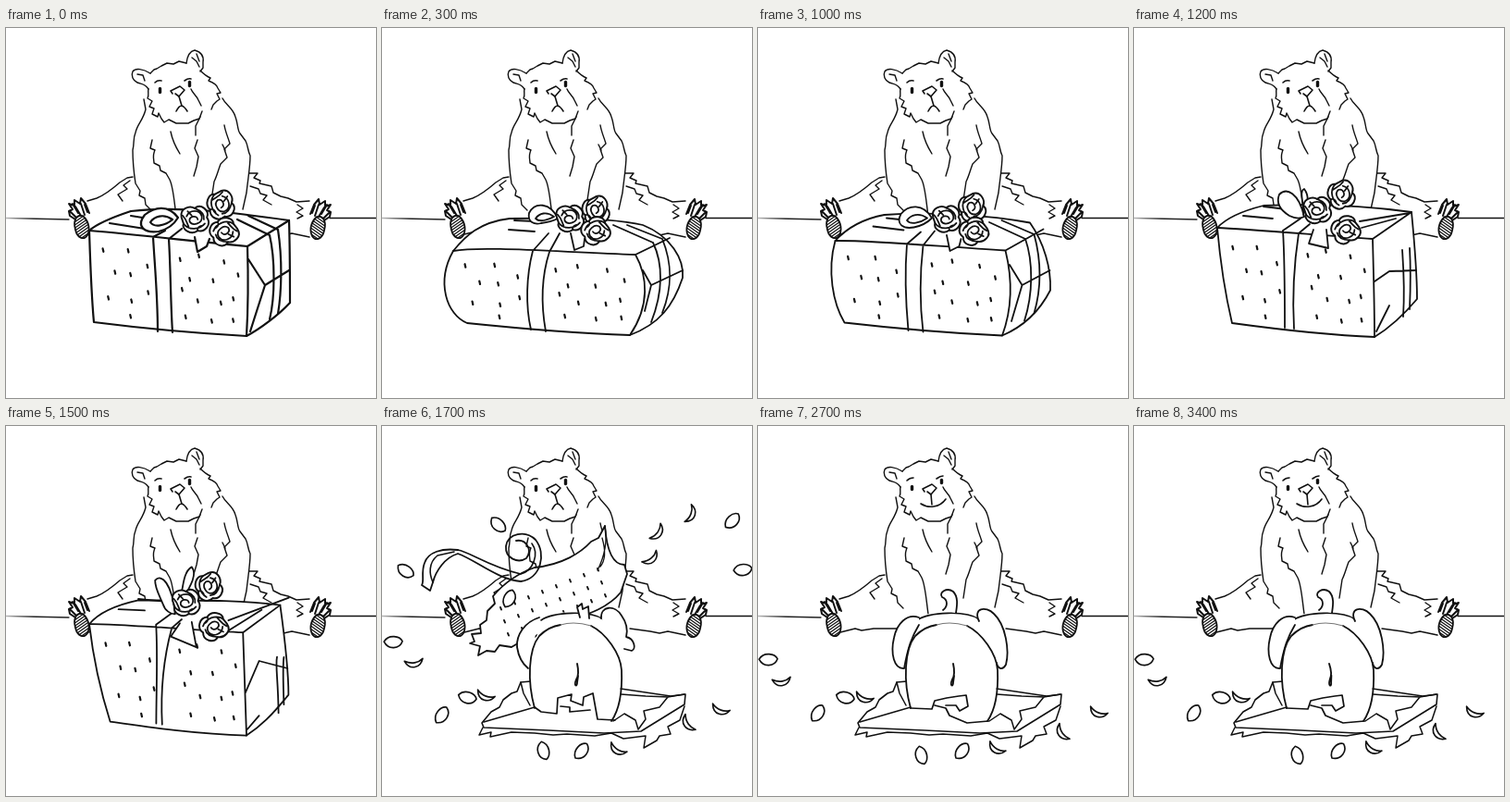
These frames come from a looping animation (400x400 px, 3.5 s). An HTML page with a canvas:

```html
<!DOCTYPE html>
<html lang="en">
<meta charset="utf-8">
<title>Bear and gift</title>
<style>
  html, body { margin: 0; width: 100%; height: 100%; overflow: hidden; background: #fff }
  canvas { display: block; width: 400px; height: 400px }
</style>
<canvas id="stage" width="400" height="400"></canvas>
<script>
const ctx = document.getElementById('stage').getContext('2d');
ctx.lineCap = ctx.lineJoin = 'round';

function draw(path, width = 1.4, fill) {
  const shape = new Path2D(path);
  if (fill) { ctx.fillStyle = fill; ctx.fill(shape); }
  ctx.lineWidth = width;
  if (width) ctx.stroke(shape);
}

function place(x, y, angle, size, paint) {
  ctx.save();
  ctx.translate(x, y);
  ctx.rotate(angle * Math.PI / 180);
  ctx.scale(size, size);
  paint();
  ctx.restore();
}

const numbers = text => text.match(/-?[\d.]+/g).map(Number);

// Blends two strings that differ only in their numbers
function mix(a, b, t) {
  const to = numbers(b);
  let i = 0;
  return a.replace(/-?[\d.]+/g, n => (+n + (to[i++] - n) * t).toFixed(2));
}

// ---- Bear ----
const bearLines = [
  // ears and head
  'M154 66C150 60 147 61 142 59C137 57 135 51 137 47C140 43 148 44 156 49M142 50L148 51L150 57',
  'M195 38C196 30 199 25 204 24C211 26 214 31 213 37L213 43L210 47M201 32L206 36L209 42M206 28L209 36',
  'M156 49L160 45L163 44L168 41L174 38L181 39L187 36L195 38M210 46C214 50 216 52 221 54L219 57C224 59 228 61 229 65L232 70L228 71L231 77L228 79L224 83L222 88',
  'M154 66C153 70 155 72 153 76L158 79L155 85L160 87L158 93L164 96L165 92L168 98L171 102L176 99L184 103L191 103L197 103L203 100L209 98L212 90M200 66C202 71 206 73 208 78L211 84',
  // torso and arms
  'M149 77L151 88C148 100 142 104 140 113C137 120 139 124 137 132C137 145 138 155 140 168L145 176L144 181L150 184L151 191L157 197',
  'M234 76C238 84 245 86 248 96C251 104 250 110 253 114L259 122C262 128 261 132 264 138C264 150 262 160 260 178L256 196',
  'M158 121L156 130L161 132C158 138 160 142 160 146L166 149L167 154L173 157L177 164C181 172 182 190 184 203M178 112C180 122 183 128 188 136',
  'M236 105C237 112 240 118 242 125L236 131L239 140L232 147C229 155 228 160 225 166L222 186',
  'M210 96L205 106L205 116M207 121L204 130L208 139L206 150L203 160M234 126L237 132',
  // legs
  'M137 161L131 162L123 167C115 174 108 180 98 184L88 187M89 223L105 219L112 221L125 219L136 219L150 219M134 165L127 170L131 174L121 180L126 187',
  'M263 157L272 157L268 162L275 165L274 168L287 171L289 178L297 182L305 184L314 188L328 187M328 226L309 222L300 224L290 222L268 219',
  'M264 171L273 174L275 179L282 181L278 186L287 191M315 191L321 195L314 199L321 203L315 206'
];

function foot(flip) {
  ctx.save();
  if (flip) { ctx.translate(419, 1); ctx.scale(-1, 1); }
  const sole = 'M88 224C84 230 77 227 75 218C72 207 77 201 83 203C88 207 92 216 88 224Z';
  draw(sole, 1.8, '#fff');
  ctx.save();
  ctx.clip(new Path2D(sole));
  for (let y = 205; y < 242; y += 3.2) draw(`M72 ${y}L92 ${y - 14}`, 1.2);
  ctx.restore();
  draw('M75 207L69 203L68 198L72 196L68 190L74 192L74 186L80 190L81 184L86 190L90 200M70 199L76 205M75 193L81 203M81 190L85 202M72 190L78 200M85 191L88 199', 2);
  ctx.restore();
}

const frown = 'M187 74L190 84M184 90Q187 84 190 84Q193 85 196 90M161 59Q164 56 168 57M193 57Q197 54 200 55';
const smile = 'M187 74L188 85M176 84Q182 88 190 87Q198 86 203 79M161 59Q164 56 168 56M193 57Q197 54 200 54';

function bear(joy) {
  const horizon = ctx.createLinearGradient(0, 0, 60, 0);
  horizon.addColorStop(0, '#bbb');
  horizon.addColorStop(.5, '#222');
  ctx.strokeStyle = horizon;
  draw('M0 205.5L68 207', 1.3);
  ctx.strokeStyle = '#111';
  draw('M350 205.5L400 205.5', 1.3);
  bearLines.forEach(line => draw(line));
  foot(false);
  foot(true);
  draw('M178 68L188 63L193 67L187 74L183 71M178 68L180 71', 1.6);
  draw(mix(frown, smile, joy), 1.6);
  for (const [x, y] of [[166.5, 68], [198.5, 61]])
    draw(`M${x} ${y - 2.5}L${x} ${y + 1.5 - joy}`, 3.4);
}

// ---- Gift: silhouette | edges and ribbon | bow | rose centres | front corners ----
const poses = {
  rest: `M90 219C100 210 120 203 135 198C190 192 250 200 306 208C307 240 307 270 307 297C295 310 275 325 260 333C205 330 150 325 95 318C92 285 91 250 90 219Z|
    M90 219C150 224 205 231 261 236C262 270 262 300 260 333M261 236L306 208M159 226C161 260 164 290 164 328M176 228C178 260 178 300 180 329M159 226L172 219M176 228L190 217M285 224C291 250 291 290 285 315M294 218C299 250 298 285 294 309M262 250L280 278L306 262M280 278L264 328M250 207L285 224M262 203L294 218M112 211L150 217M135 203L160 207|
    M186 205C175 190 160 194 150 202C140 215 150 222 165 220C178 217 183 210 186 205M180 207C170 200 160 204 156 210C160 216 172 214 180 207M204 226L207 242L217 236L220 228|
    204 207 232 191 236 220|90 219 261 236 260 333 95 318`,
  squash: `M77 241C90 225 105 210 138 206C190 205 250 205 282 213C312 225 327 250 325 270C315 300 300 320 268 332C210 330 150 325 92 319C70 310 58 275 77 241Z|
    M77 241C110 235 200 243 274 245C287 268 290 300 268 332M274 245L311 227M163 241C156 268 155 300 161 326M181 242C172 270 172 300 177 328M163 241L180 222M181 242L192 222M293 232C304 255 304 285 291 318M303 228C314 255 314 280 303 308M282 262L291 278L325 262M291 278L284 306M250 213L293 232M265 213L303 228M137 218L165 220M143 208L165 209|
    M190 206C182 188 165 188 159 200C157 210 165 213 172 211C180 210 186 208 190 206M186 204C178 198 170 200 166 206C170 210 178 208 186 204M204 222L208 240L218 236L219 228|
    203 206 231 197 231 219|72 241 272 247 277 327 80 318`,
  settle: `M89 230C100 220 118 210 133 204C190 195 250 197 306 215C313 235 314 255 313 270C305 295 280 318 262 331C210 333 150 328 97 317C86 305 78 270 89 230Z|
    M89 230C140 228 200 233 260 246C268 275 270 305 262 331M260 246L306 215M160 229C155 260 157 300 162 328M179 231C174 265 174 300 181 329M160 229L182 210M179 231L195 215M288 228C302 255 302 285 290 315M297 222C308 250 308 280 297 311M264 246L278 276L313 258M278 276L264 328M250 207L288 228M262 207L297 222M128 208L150 214M140 203L165 206|
    M190 204C182 186 165 186 159 198C150 206 140 208 134 207C140 216 170 220 190 204M186 202C178 196 168 198 162 206C168 208 176 207 186 202M212 222L210 232L220 234L222 226|
    204 205 230 192 236 215|85 230 262 243 264 330 91 317`,
  stretch: `M90 216C100 205 120 197 140 192C190 190 250 192 300 199C303 230 306 265 306 293C290 312 275 325 260 334C205 332 150 325 106 319C98 285 93 250 90 216Z|
    M90 216C120 217 200 224 258 228C259 265 260 300 260 334M258 228L300 199M161 219C163 250 163 290 163 324M178 222C173 255 171 290 173 325M161 219L180 206M178 222L190 212M290 240C291 255 293 280 291 312M298 238C299 255 299 280 298 304M260 274L276 263L305 262M276 300L262 328M244 209L298 200M246 216L283 206M118 203L150 206M140 193L165 196|
    M184 204C178 178 165 172 157 180C153 190 160 198 168 203C174 206 180 206 184 204M183 202C184 190 178 176 184 174C190 182 188 190 183 202M194 218L189 233L210 238L208 218|
    198 197 224 180 229 218|90 216 258 228 260 334 106 319`
};

// One entry per step: from, to, amount
const giftSteps = ['rest rest 0', 'rest squash .4', 'rest squash .8', 'squash squash 0', 'squash squash 0',
  'squash settle .3', 'squash settle .7', 'settle settle 0', 'rest rest 0', 'rest rest 0', 'rest squash .5',
  'settle stretch .5', 'stretch stretch 0', 'rest squash .6', 'rest squash 1.3', 'rest stretch 1.6'];

const dots = [[.08, .2], [.24, .18], [.15, .43], [.25, .44], [.36, .33], [.1, .72], [.25, .73], [.36, .62], [.24, .9],
  [.57, .22], [.69, .16], [.85, .2], [.94, .33], [.63, .43], [.78, .42], [.91, .6], [.58, .55], [.68, .66], [.83, .66],
  [.6, .85], [.77, .87], [.91, .84]];

function rose(x, y, turn) {
  place(x, y, turn, 1.1, () => {
    draw('M-13 -2C-15 -11 -5 -14 0 -11C6 -16 15 -9 12 -2C17 5 10 13 3 11C-3 16 -13 10 -11 4Z', 1.8, '#fff');
    draw('M-8 -3C-5 -10 5 -10 7 -3C8 4 -2 7 -5 2C-6 -3 2 -5 3 0M-11 4C-6 11 5 10 10 4M0 -11C5 -9 10 -6 9 0M-12 -4C-8 0 -8 3 -6 7M3 11C2 8 5 6 8 6M-7 -8L-3 -4', 1.6);
  });
}

function gift(step) {
  const [from, to, amount] = giftSteps[step].split(' ');
  const [body, lines, bow, centres, corners] = mix(poses[from], poses[to], +amount).split('|');
  const width = from === to && from === 'rest' ? 2.2 : 1.8;
  draw(body, width, '#fff');
  draw(lines, width);
  const [ax, ay, bx, by, cx, cy, dx, dy] = numbers(corners);
  const blend = (a, b, c, d, u, v) => (a * (1 - u) + b * u) * (1 - v) + (d * (1 - u) + c * u) * v;
  for (const [u, v] of dots) {
    const x = blend(ax, bx, cx, dx, u, v), y = blend(ay, by, cy, dy, u, v);
    draw(`M${x} ${y - 1.7}L${x + .8} ${y + 1.7}`, 2.2);
  }
  draw(bow, width, '#fff');
  const [x1, y1, x2, y2, x3, y3] = numbers(centres);
  rose(x2, y2, 80);
  rose(x1, y1, 0);
  rose(x3, y3, 160);
}

// ---- Unwrapped scene ----
function tray() {
  draw('M161 276L150 277L146 287L131 296L127 304L118 309L108 321L110 326L240 332L280 330L286 324L326 301L328 290L312 292L258 284Z', 0, '#fff');
  draw('M161 276L150 277L146 287L140 289L131 296L127 304L118 309L108 321L110 326L180 329L240 332L280 330L327 301L328 290L312 292L258 284', 1.6);
  draw('M150 277L153 289L160 302M110 320L165 304M258 290L285 292L310 293M250 319L262 311L274 318L277 328L285 317L283 308L300 304L309 293L327 290', 1.5);
  draw('M109 326L105 334L118 331L117 336L140 331L165 332L185 334L200 333L230 335L248 332L261 338L285 335L283 348L297 340L300 335L312 333L309 325L322 318L327 303', 1.5);
}

const ovalPetal = 'M-9 0C-5 -8 6 -7 9 -2C7 6 -4 8 -9 0Z';
const thinPetal = 'M-9 -4C-3 1 4 1 9 -2C5 6 -6 7 -9 -4Z';
// x, y, then resting x, y, angle, thin
const landing = [[12, 234, 11, 253, 5, 0], [35, 256, 26, 276, -15, 1], [65, 313, 65, 311, -50, 0], [92, 294, 94, 294, 20, 0],
  [112, 292, 115, 294, 15, 1], [174, 351, 176, 356, 80, 0], [216, 352, 221, 352, -45, 0], [255, 350, 258, 349, 25, 1],
  [366, 307, 368, 310, 15, 1], [331, 322, 329, 332, 50, 1]];
const airborne = [[125, 107, 50, 0], [25, 157, 40, 0], [334, 95, -75, 1], [379, 103, -40, 0], [390, 156, 0, 0],
  [298, 115, -60, 1], [291, 143, -45, 1], [138, 187, -60, 0]];

function petals(step) {
  const spread = step < 17 ? .6 : 1;
  const t = Math.max(0, Math.min(1, (step - 17) / 4));
  const petal = (x, y, angle, thin) => place(200 + (x - 200) * spread, 230 + (y - 230) * spread, angle, 1.1,
    () => draw(thin ? thinPetal : ovalPetal, 1.5, '#fff'));
  for (const [x, y, endX, endY, angle, thin] of landing)
    petal(x + (endX - x) * t, y + (endY - y) * t, angle, thin);
  if (step < 19)
    for (const [x, y, angle, thin] of airborne)
      petal(x + (x < 200 ? -20 : 20) * (step > 17), y + 45 * (step > 17), angle, thin);
}

function wrapping() {
  draw('M97 225L100 233L95 235L106 238L104 248L113 243L122 244L127 237L140 239L152 232L165 228C190 208 235 208 258 180L265 160L262 150C250 150 243 135 241 108L234 121L226 125C215 137 195 150 165 153C145 160 130 172 120 184L122 192L114 200L113 210L106 215L107 224Z', 1.8, '#fff');
  draw('M241 108C244 125 241 140 233 156M238 121C242 135 242 145 236 152', 1.3);
  for (let i = 0; i < 24; i++) {
    const u = i % 8, v = i >> 3;
    const x = 128 + u * 15 + v * 4, y = 196 - u * 6 + v * 14;
    draw(`M${x} ${y}L${x + 1} ${y + 2.5}`, 2);
  }
  draw('M82 134C65 132 50 136 46 148C42 158 46 168 43 172L52 178L55 169C58 157 68 142 82 138C100 144 125 166 150 168C172 165 178 138 166 123C155 112 136 116 134 130C133 143 147 149 156 143C163 134 156 122 145 124', 1.8);
  draw('M82 134C95 136 115 152 150 160C164 156 170 138 162 127M55 169C51 160 50 148 60 140L78 136', 1.6);
}

function elephant(step) {
  const early = step < 18;
  draw('M163 245L172 208C185 199 225 199 239 208L255 245Z', 0, '#fff');
  draw('M172 210C185 201 225 199 239 209', 1.6);
  draw(early ? 'M170 207C154 212 145 226 146 239C148 252 153 258 158 262'
             : 'M174 207C161 202 150 214 147 229C143 246 147 263 158 262C162 240 166 228 174 215', 1.8, '#fff');
  draw(early ? 'M237 208C236 194 252 193 259 205C264 212 266 220 264 228C273 230 275 241 270 243L262 241'
             : 'M239 211C232 197 246 194 255 203C268 215 272 243 268 258C264 265 259 262 258 256', 1.8, '#fff');
  draw('M165 303C157 276 158 242 170 227C185 214 228 214 241 227C257 245 265 285 248 319L226 321L203 306Z', 0, '#fff');
  draw('M165 305C157 276 158 242 170 227C178 219 186 216 193 215M226 216C242 224 258 246 259 264C260 290 255 309 248 319', 1.8);
  ctx.strokeStyle = '#777';
  draw('M193 215C203 212 216 213 226 216', 1.1);
  ctx.strokeStyle = '#111';
  draw(early ? 'M214 207L211 196L216 192L217 198L223 195L224 208'
             : 'M200 199C205 195 206 188 199 185C195 180 204 174 211 179C217 185 215 195 214 202', 1.8, '#fff');
  draw(early ? 'M165 304L172 309L189 311L190 294L205 290L204 297L217 302L218 293L228 289L233 317L252 318M193 303L203 304L203 309L225 307'
             : 'M165 305L188 306L191 297L204 294L217 292L225 291L227 303L218 308L214 302L203 302M191 302L203 305L207 313L226 321L249 319', 1.7);
  const swing = step < 21 ? 0 : [0, -6, -18, -28, -18, -6][(step - 21) % 6];
  place(211, 257, swing, 1, () => draw('M0 0C2 9 1 14 -1 17C-4 24 0 26 0 20L1 13', 1.9));
}

function unwrapped(step) {
  tray();
  if (step < 19) {
    const shift = [[20, -38], [0, 0], [-130, 35]][step - 16];
    place(...shift, 0, 1, wrapping);
  }
  elephant(step);
  petals(step);
}

function render() {
  const step = Math.floor(performance.now() % 3500 / 100);
  ctx.fillStyle = '#fff';
  ctx.fillRect(0, 0, 400, 400);
  ctx.strokeStyle = '#111';
  bear(Math.max(0, Math.min(1, (step - 21) / 6)));
  if (step < 16) gift(step);
  else unwrapped(step);
  requestAnimationFrame(render);
}
render();
</script>
</html>
```
